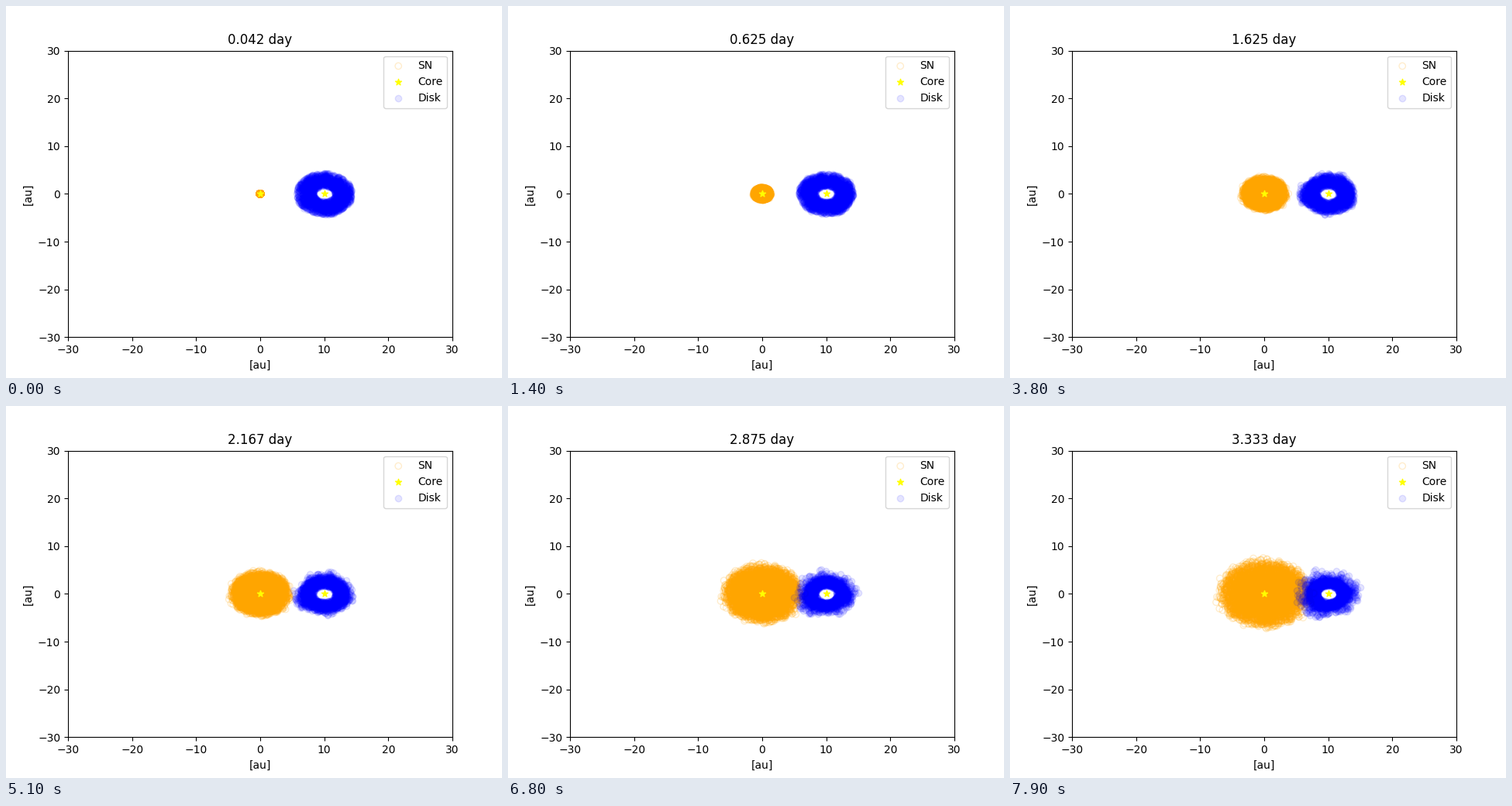
Animation, 640 px wide and 480 px high, one loop 8 s. Source, as a matplotlib script:

```python
import matplotlib.pyplot as plt
import numpy as np
from matplotlib.animation import FuncAnimation

FRAMES, STEP = 80, 1 / 24          # one hour per frame
N_SN, N_DISK = 5000, 1500
R_IN, R_OUT = 1.63, 4.35
CENTER = np.array([10.0, 0.0])

rng = np.random.default_rng(12)

# Ejecta: homologous expansion of a ball seen in projection
way = rng.normal(size=(N_SN, 3))
way /= np.linalg.norm(way, axis=1, keepdims=True)
speed = 2.08 * np.cbrt(rng.random(N_SN)) * (1 + 0.06 * rng.normal(size=N_SN))
velocity = way[:, :2] * speed[:, None]

# Disk: orbits that settle inwards while a few particles scatter out
u = rng.random(N_DISK)
r_start = R_IN + (R_OUT - R_IN) * u
theta = rng.uniform(0, 2 * np.pi, N_DISK)
omega = 1.9 * (r_start / R_IN) ** -1.5
r_end = (R_IN + 1.25 * u + 2.6 * rng.random(N_DISK) ** 5
         + 0.35 * u * np.sin(3 * theta) + 0.25 * u * rng.normal(size=N_DISK))
r_end = np.maximum(r_end, R_IN)


def disk_at(day):
    mix = min(day / 3.4, 1) ** 1.4
    r = r_start + (r_end - r_start) * mix
    angle = theta + omega * day
    return CENTER + np.column_stack((r * np.cos(angle), r * np.sin(angle)))


fig, ax = plt.subplots(figsize=(6.4, 4.8), dpi=100)
sn = ax.scatter(*velocity.T, facecolors="none", edgecolors="orange",
                alpha=0.2, label="SN")
ax.scatter([0, 10.05], [0, 0], c="yellow", marker="*", label="Core")
disk = ax.scatter(*disk_at(0).T, c="blue", alpha=0.1, label="Disk")

ax.set(xlim=(-30, 30), ylim=(-30, 30), xlabel="[au]", ylabel="[au]")
title = ax.set_title("")
ax.legend(loc="upper right")


def update(i):
    day = (i + 1) * STEP
    sn.set_offsets(velocity * day)
    disk.set_offsets(disk_at(day))
    title.set_text(f"{day:.3f} day")
    return sn, disk, title


anim = FuncAnimation(fig, update, frames=FRAMES, interval=100,
                     repeat=True, repeat_delay=0)
plt.show()
```
